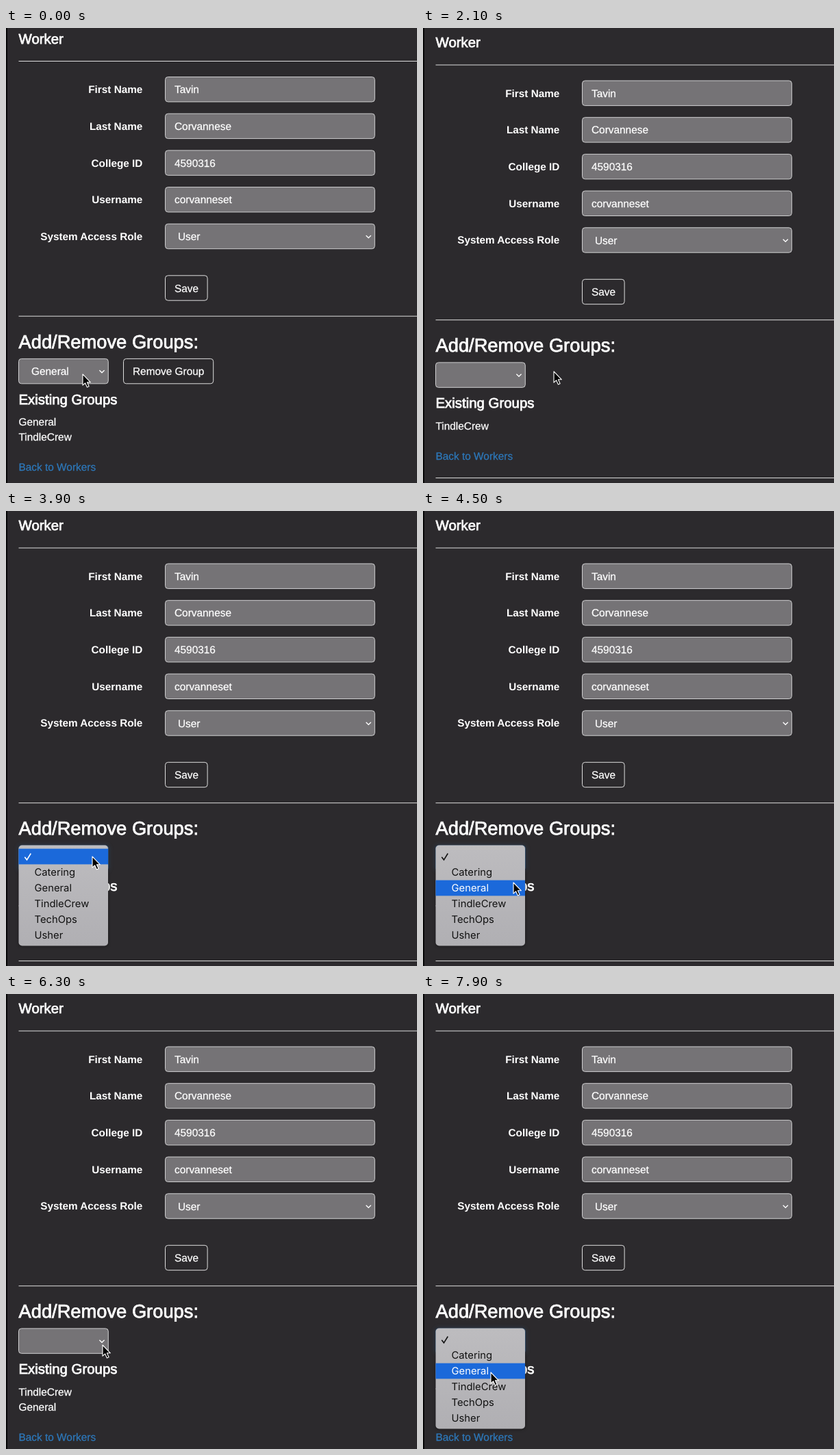
Recreate the animation shown at these times as an HTML page. Size 600 by 665 pixels, loop 8000 ms.

```html
<!DOCTYPE html>
<html lang="en">
<head>
<meta charset="utf-8">
<title>Worker groups</title>
<style>
  html, body { margin: 0; height: 100%; overflow: hidden; background: #2c2a2d; }
  svg { display: block; font: 15.4px "Liberation Sans", Arial, sans-serif; fill: #fff; }
  text { white-space: pre; text-rendering: geometricPrecision; }
  #page text { stroke: #fff; stroke-width: .25px; }
  #page .label { font-weight: bold; font-size: 15.3px; text-anchor: end; stroke: none; }
  #page .heading { font-size: 20.4px; stroke-width: .75px; }
  #page .large { font-size: 27.3px; stroke-width: .8px; }
  .line { stroke: #dedede; }
  .field { fill: #757376; stroke: #cfcfd0; }
  .button { fill: none; stroke: #dedede; }
  .chevron { fill: none; stroke: #fff; stroke-width: 1.3; }
  .focused { stroke: #5ba6e4; filter: drop-shadow(0 0 3px rgba(84, 165, 235, .55)); }
  .covered { stroke: #35587c; filter: drop-shadow(0 0 3px rgba(60, 110, 160, .35)); }
  #page #link { fill: #2d78ba; stroke: #2d78ba; }
  #menu { font: 14.8px Inter, sans-serif; fill: #111; }
  #panel { fill: url(#shade); filter: drop-shadow(0 1px 2px rgba(0, 0, 0, .4)); }
  #highlight { fill: #1b69da; }
  #check { fill: none; stroke: #111; stroke-width: 1.6; }
  #menu .active { fill: #fff; }
  #menu #check.active { fill: none; stroke: #fff; }
</style>
</head>
<body>
<svg width="600" height="665" viewBox="0 0 600 665">
  <linearGradient id="shade" x2="0" y2="1">
    <stop stop-color="#bdbcbf"/><stop offset="1" stop-color="#b0afb3"/>
  </linearGradient>
  <rect width="2" height="665" fill="#070708"/>
  <g id="page">
    <text class="heading" x="18.5" y="22.8">Worker</text>
    <path class="line" d="M18.5 48.5H600M18.5 421.2H600"/>
    <g id="form"></g>
    <path class="chevron" d="M525.6 303.2l3.6 3.6 3.6-3.6"/>
    <rect class="button" x="232.5" y="361.8" width="61.6" height="36.4" rx="4"/>
    <text x="246" y="385.5">Save</text>
    <text class="heading large" x="18.5" y="467.8">Add/Remove Groups:</text>
    <rect id="select" class="field" x="18.5" y="483.4" width="130.8" height="36.4" rx="4"/>
    <text id="choice" x="37" y="507.4">General</text>
    <path class="chevron" d="M136.4 500.2l3.6 3.6 3.6-3.6"/>
    <g id="action">
      <rect id="actionBox" class="button" x="171.5" y="483.4" height="36.4" rx="4"/>
      <text id="actionText" x="185" y="507.4"></text>
    </g>
    <text class="heading" x="18.5" y="549.8">Existing Groups</text>
    <text id="first" x="18.5" y="581"></text>
    <text id="second" x="18.5" y="603"></text>
    <g id="footer">
      <text id="link" x="18.5" y="625">Back to Workers</text>
      <path class="line" d="M18.5 652.1H600"/>
    </g>
  </g>
  <g id="menu">
    <rect id="panel" x="18.5" y="488.6" width="130.5" height="146.8" rx="5"/>
    <rect id="highlight" x="18.5" width="130.5" height="22.8"/>
    <path id="check" class="option" d="M27.3 505.8l3.2 4 5.8-9.3"/>
  </g>
  <g id="cursor" stroke-linejoin="round">
    <path id="arrow" fill="#000" stroke="#fff" stroke-width="1.1"
      d="M0 0V16.2l3.6-3.4 2.8 6.1 2.7-1.2-2.7-5.9h5z"/>
    <g id="hand" fill="#fff" stroke="#000" transform="translate(0 -.8)">
      <path d="M-1.7 1.6Q-1.5 0 0 0T1.7 1.6L2.3 5.6Q4 4.6 4.8 6.2 6.4 5.6 7 7.3 9 7 9.1 9.2
        L8.7 13 7.6 16.8H.2L-1.5 14-5 9.8Q-5.6 7.8-3.6 7.8L-.9 9.6Z"/>
      <path fill="none" stroke-width=".9" d="M1.8 10.8l.3 3.8M4 10.6l.2 4M6.2 10.6v3.8"/>
    </g>
  </g>
</svg>
<script>
const LOOP = 8000, REMOVED = 1600, CHOSEN = 5200, BLURRED = 5800, ADDED = 6100;
const TEAM = "TindleCrew";
const $ = id => document.getElementById(id);
const show = (id, on) => $(id).setAttribute("visibility", on ? "visible" : "hidden");
const move = (id, x, y) => $(id).setAttribute("transform", `translate(${x} ${y})`);
const within = (t, from, to) => t >= from && t < to;

const fields = [
  ["First Name", "Tavin"],
  ["Last Name", "Corvannese"],
  ["College ID", "4590316"],
  ["Username", "corvanneset"],
  ["System Access Role", "User"]
];
$("form").innerHTML = fields.map(([label, value], i) => {
  const y = 71.5 + i * 53.7;
  return `<text class="label" x="199.3" y="${y + 23.6}">${label}</text>
    <rect class="field" x="232.5" y="${y}" width="305.8" height="36.4" rx="4"/>
    <text x="${i === 4 ? 251 : 246}" y="${y + 23.7}">${value}</text>`;
}).join("");

$("menu").insertAdjacentHTML("beforeend",
  ["Catering", "General", TEAM, "TechOps", "Usher"].map((name, i) =>
    `<text class="option" x="41.5" y="${533.4 + i * 23}">${name}</text>`).join(""));
const options = document.querySelectorAll(".option");

// time, x, y
const path = [
  [0, 112, 506], [500, 112, 506], [1200, 191, 502], [2400, 191, 502],
  [3300, 126, 505], [4200, 126, 505], [4500, 132, 543], [5150, 132, 543],
  [5500, 226, 519], [5950, 226, 519], [6300, 141, 513], [7500, 141, 513],
  [7800, 138, 528], [7900, 99, 553], [LOOP, 99, 553]
];

function cursorAt(t) {
  const i = path.findIndex(p => p[0] > t);
  const [t0, x0, y0] = path[i - 1], [t1, x1, y1] = path[i];
  const u = (t - t0) / (t1 - t0), k = u * u * (3 - 2 * u);
  return [x0 + (x1 - x0) * k, y0 + (y1 - y0) * k];
}

function render(t) {
  const [x, y] = cursorAt(t);
  const removing = t < REMOVED, adding = within(t, CHOSEN, ADDED);
  const groups = removing ? ["General", TEAM] : t < ADDED ? [TEAM] : [TEAM, "General"];
  const open = within(t, 3800, CHOSEN) || t >= 7200;
  const focused = within(t, CHOSEN, BLURRED);
  const width = removing ? 131.2 : 102.7;

  move("page", 0, removing ? 0 : 5.5);
  $("first").textContent = groups[0];
  $("second").textContent = groups[1] || "";
  move("footer", 0, (groups.length - 1) * 22);

  show("choice", removing || adding);
  $("select").setAttribute("class", "field" + (open ? " covered" : focused ? " focused" : ""));
  show("action", removing || adding);
  $("actionBox").setAttribute("width", width);
  $("actionText").textContent = removing ? "Remove Group" : "Add Group";

  const row = Math.max(0, Math.min(5, Math.floor((y - 493.5) / 23)));
  show("menu", open);
  $("highlight").setAttribute("y", 493.6 + row * 23);
  options.forEach((option, i) => option.classList.toggle("active", i === row));

  const pointing = (removing || adding) && within(x, 171, 171 + width);
  move("cursor", x, y);
  show("hand", pointing);
  show("arrow", !pointing);
}

function tick() {
  render(performance.now() % LOOP);
  requestAnimationFrame(tick);
}
tick();
</script>
</body>
</html>
```
